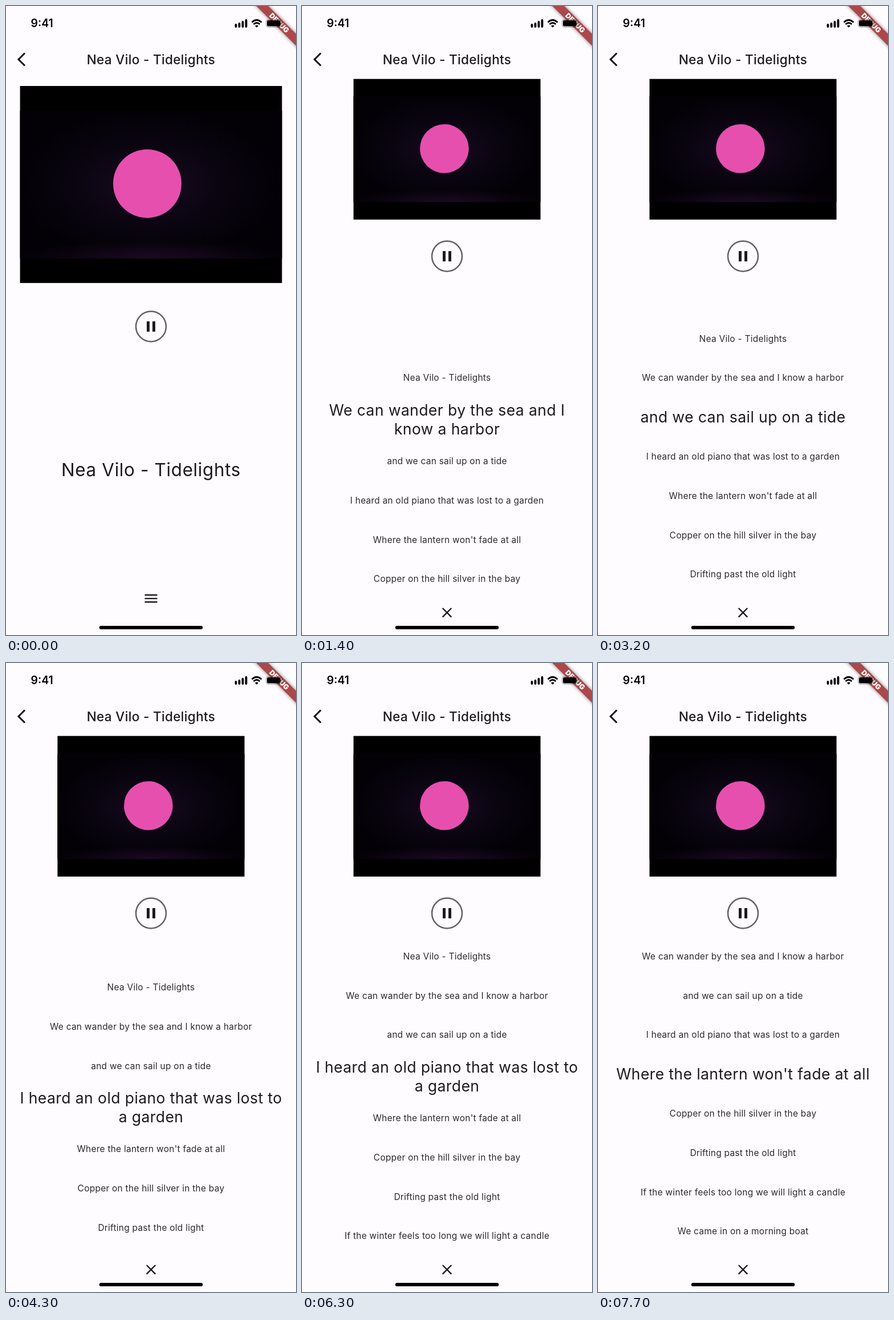
These frames come from a looping animation (509 by 1101 pixels, 8000 ms). An HTML page:

```html
<!DOCTYPE html>
<html lang="en">
<head>
<meta charset="utf-8">
<title>Lyrics player</title>
<style>
  html, body { margin: 0; width: 100%; height: 100%; overflow: hidden; background: #fffcff; }
  svg { display: block; width: 100vw; height: 100vh; }
  text { font-family: Inter, "Open Sans", sans-serif; fill: #1c1b1f; text-anchor: middle; }
  .small { font-size: 15.5px; letter-spacing: .24px; fill: #2a292d; }
  .big { font-size: 26.6px; letter-spacing: .38px; }
  .line { fill: none; stroke: #1c1b1f; stroke-width: 2.4; }
</style>
</head>
<body>
<svg viewBox="0 0 509 1101">
  <defs>
    <radialGradient id="glow" cx=".49" cy=".5" r=".5">
      <stop offset="0" stop-color="#1a0b22"/>
      <stop offset=".5" stop-color="#0b0512"/>
      <stop offset="1" stop-color="#030106"/>
    </radialGradient>
    <radialGradient id="floor" cx=".5" cy="1" r=".5">
      <stop offset="0" stop-color="#1c0a24"/>
      <stop offset="1" stop-color="#1c0a24" stop-opacity="0"/>
    </radialGradient>
    <clipPath id="viewport"><rect y="467" width="509" height="581"/></clipPath>
    <filter id="blur" x="-20%" y="-60%" width="140%" height="220%"><feGaussianBlur stdDeviation="3"/></filter>
  </defs>
  <rect width="509" height="1101" fill="#fffcff"/>

  <path d="M33 82.500 22 93.500 33 104.500" class="line" style="stroke:#000;stroke-width:3"/>
  <text x="254.500" y="102" font-size="22.600" font-weight="500" letter-spacing=".3">Nea Vilo - Tidelights</text>

  <g id="cover">
    <rect width="460" height="345" fill="#000"/>
    <rect y="43" width="460" height="259" fill="url(#glow)"/>
    <rect y="240" width="460" height="62" fill="url(#floor)"/>
    <circle cx="223.500" cy="171" r="60" fill="#e64fae"/>
  </g>

  <g id="button">
    <circle r="26.500" fill="none" stroke="#606164" stroke-width="2.500"/>
    <path d="M-7.500-9h5V9h-5zM2.500-9h5V9h-5z" fill="#1c1b1f"/>
  </g>

  <g id="closed">
    <text x="254.500" y="823.300" font-size="31.500" letter-spacing=".6">Nea Vilo - Tidelights</text>
    <path d="M243.500 1031h22m-22 6.150h22m-22 6.150h22" class="line"/>
  </g>
  <g id="open">
    <g id="lyrics" clip-path="url(#viewport)"></g>
    <path d="M246.700 1054 262.300 1069.600m0-15.600-15.600 15.600" class="line"/>
  </g>

  <g transform="translate(509) rotate(45)">
    <rect x="-60" y="34.400" width="120" height="14.800" opacity=".5" filter="url(#blur)"/>
    <rect x="-60" y="34.400" width="120" height="14.800" fill="#ad474a"/>
    <text y="46.200" font-size="12.300" font-weight="900" style="fill:#fff">DEBUG</text>
  </g>

  <text x="63.200" y="37.300" font-size="19.500" font-weight="600" style="fill:#000">9:41</text>
  <path d="M403.500 33v3m6-5v5m6-8v8m6-11v11" fill="none" stroke="#000" stroke-width="3.800" stroke-linecap="round"/>
  <g fill="none" stroke="#000" stroke-width="2.700">
    <path d="M431.500 28.500q8.500-8 17 0M434.500 32q5.500-5 11 0"/>
    <path d="M437 34.700q3-2.500 6 0l-3 3z" fill="#000" stroke="none"/>
  </g>
  <rect x="456.500" y="23.500" width="27" height="13.600" rx="4" fill="none" stroke="#000" stroke-opacity=".4"/>
  <rect x="458" y="25" width="24" height="10.600" rx="2.800"/>
  <path d="M485 28q2.500 2.300 0 4.600z" opacity=".5"/>
  <rect x="163.700" y="1085" width="181.600" height="6" rx="3"/>
</svg>

<script>
const LOOP = 8000, STEP = 100, MOVE = 400;
const ROW = 68.8, TALL_ROW = 76.8, ACTIVE_TOP = 685.2, MID = 254.5;
const OPEN_AT = 100;
const CUES = [500, 2300, 4300, 7300];   // moments when the next line becomes active

// "|" marks where the enlarged line wraps
const LINES = [
  'Nea Vilo - Tidelights',
  'We can wander by the sea and I|know a harbor',
  'and we can sail up on a tide',
  'I heard an old piano that was lost to|a garden',
  "Where the lantern won't fade at all",
  'Copper on the hill silver in the bay',
  'Drifting past the old light',
  'If the winter feels too long we will light a candle',
  'We came in on a morning boat'
];

const byId = id => document.getElementById(id);
const lerp = (a, b, p) => a + (b - a) * p;
const show = (el, on) => el.setAttribute('display', on ? 'inline' : 'none');
const place = (el, x, y, scale = 1) =>
  el.setAttribute('transform', `translate(${x} ${y}) scale(${scale})`);
// Linear move that is already under way on its first visible step
const progress = (t, start) => Math.min(1, Math.max(0, (t - start + 84) / MOVE));

function add(parent, tag, attrs = {}) {
  const el = document.createElementNS('http://www.w3.org/2000/svg', tag);
  for (const key in attrs) el.setAttribute(key, attrs[key]);
  return parent.appendChild(el);
}

function makeRow(line) {
  const group = add(byId('lyrics'), 'g');
  const small = add(group, 'text', { class: 'small', y: 5.6 });
  small.textContent = line.replace('|', ' ');
  const big = add(group, 'g');
  const parts = line.split('|');
  parts.forEach((part, i) => {
    const y = (i - (parts.length - 1) / 2) * 33 + 9.7;
    add(big, 'text', { class: 'big', y }).textContent = part;
  });
  return { group, small, big, tall: parts.length > 1 };
}

const rows = LINES.map(makeRow);

function drawLyrics(t) {
  const active = CUES.filter(cue => t >= cue).length;
  const scroll = active ? active - 1 + progress(t, CUES[active - 1]) : 0;
  let top = ACTIVE_TOP - ROW * scroll;
  rows.forEach((row, i) => {
    const on = i === active;
    const height = on && row.tall ? TALL_ROW : ROW;
    show(row.big, on);
    show(row.small, !on);
    place(row.group, MID, top + height / 2);
    top += height;
  });
}

function draw(now) {
  const t = Math.floor(now % LOOP / STEP) * STEP;
  const opened = t >= OPEN_AT;
  const p = opened ? progress(t, OPEN_AT) : 0;
  place(byId('cover'), lerp(24.6, 90.4, p), lerp(140, 127.7, p), lerp(459.8, 328.2, p) / 460);
  place(byId('button'), MID, lerp(561, 438, p));
  show(byId('closed'), !opened);
  show(byId('open'), opened);
  drawLyrics(t);
}

const begin = performance.now();
function tick() {
  draw(performance.now() - begin);
  requestAnimationFrame(tick);
}
tick();
</script>
</body>
</html>
```
